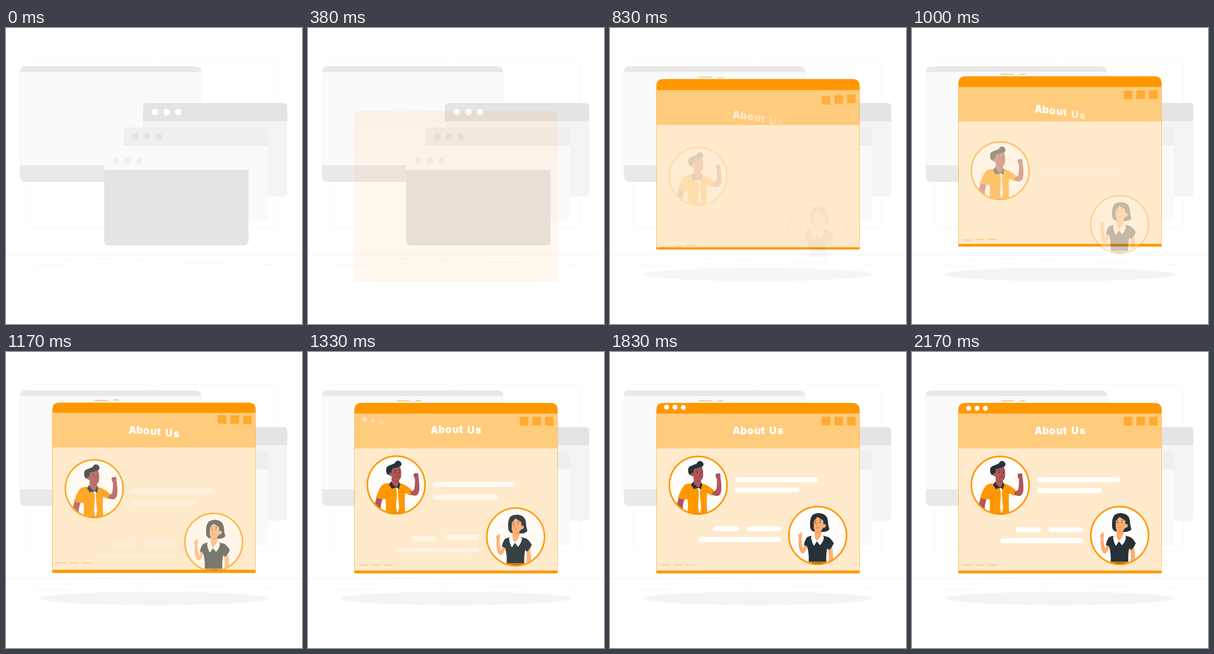
Recreate the animation shown at these times as an HTML page. Size 500 by 500 pixels, loop 2210 ms.

```html
<!DOCTYPE html>
<html lang="en">
<head>
<meta charset="utf-8">
<title>About Us</title>
<style>
html, body { margin: 0; width: 100%; height: 100%; overflow: hidden; background: #fff; }
svg { display: block; width: 100vw; height: 100vh; }
text { font: 900 17px Inter, "Open Sans", "DejaVu Sans", sans-serif; fill: #fff; }
</style>
</head>
<body>
<svg viewBox="0 0 500 500">
  <defs>
    <clipPath id="ringA"><circle cx="149" cy="225" r="48.6"/></clipPath>
    <clipPath id="ringB"><circle cx="350.8" cy="309.8" r="48.6"/></clipPath>
  </defs>

  <!-- backdrop -->
  <g fill="none" stroke="#f7f7f7">
    <rect x="38.8" y="55.3" width="203.6" height="282.2" rx="5"/>
    <rect x="255" y="55.3" width="203.6" height="282.2" rx="5"/>
    <path d="M0 382.4H500" stroke="#f2f2f2"/>
    <path stroke="#f2f2f2" d="M49 401.8H104M97 392.6H111M152 389.6H176M216 391.3H240M304 395.5H368M431 399.4H449"/>
  </g>
  <rect x="23.3" y="64.7" width="306.5" height="195.3" rx="9" fill="#e9e9e9"/>
  <rect x="23.6" y="74.4" width="306" height="157.6" fill="#fafafa"/>
  <g id="cards"></g>

  <ellipse id="shade" cx="249.8" cy="416.2" rx="193.8" ry="11.3" fill="#f4f4f4"/>

  <!-- main window -->
  <g data-w="0">
    <path fill="#ff9800" d="M78.3 373.9V98Q78.3 86 90.3 86H409.7Q421.7 86 421.7 98V373.9Z"/>
    <g id="panes" fill="#fff">
      <rect class="pane" x="78.8" y="104" width="342.5" height="58.4" data-a=".49"/>
      <rect class="pane" x="78.8" y="162.4" width="342.5" height="206.7" data-a=".8"/>
      <rect id="glint" x="78.8" y="103.6" width="342.5" height="1"/>
    </g>
  </g>
  <g fill="#ff9800" fill-opacity=".62">
    <rect data-w="0" x="150" y="81.8" width="22" height="1.5"/>
    <rect data-w=".5" x="182" y="81.8" width="9.3" height="1.5"/>
    <rect data-w="1.6" x="357.8" y="109.6" width="14.4" height="14.4"/>
    <rect data-w="1.2" x="379.1" y="109.6" width="14.4" height="14.4"/>
    <rect data-w=".9" x="400.4" y="109.6" width="14.4" height="14.4"/>
  </g>
  <g fill="#ff9800" fill-opacity=".48">
    <rect data-w="3" x="86.3" y="359.4" width="14.8" height="1.4"/>
    <rect data-w="2.5" x="107.7" y="359.4" width="14.6" height="1.4"/>
    <rect data-w="2" x="128.8" y="359.4" width="15" height="1.4"/>
  </g>
  <g id="title"></g>

  <g fill="#fff">
    <circle data-s="15.2" cx="95.6" cy="95" r="4.2"/>
    <circle data-s="16.1" cx="109.8" cy="95" r="4.2"/>
    <circle data-s="17" cx="124" cy="95" r="4.2"/>
    <rect data-s="11.1" x="211" y="211.7" width="140" height="8.4" rx="4.2"/>
    <rect data-s="12.3" x="211" y="229.8" width="109.4" height="8.4" rx="4.2"/>
    <rect data-s="13" x="230.5" y="296" width="58.7" height="8.4" rx="4.2"/>
    <rect data-s="13.8" x="175" y="296" width="43" height="8.4" rx="4.2"/>
    <rect data-s="14.2" x="149.3" y="314.3" width="140" height="8.4" rx="4.2"/>
  </g>

  <!-- man -->
  <g data-s="6.2">
    <circle cx="149" cy="225" r="49" fill="#fffefc"/>
    <g clip-path="url(#ringA)">
      <path fill="#b0565a" d="M116 246L126 249Q122 257 123 272H110Q112 258 116 246Z"/>
      <path fill="#b0565a" d="M172 234Q177 237 179.5 232Q181 226 180.6 214.5Q178 212 178.6 206.5Q180 204.6 182 205.8L185.4 204.6Q187.2 208 186.6 212Q188.8 224 188 234Q186.6 243.5 180 243.2L170 241Z"/>
      <path fill="#ff9800" d="M138 222Q128 222 124.5 226Q119 234 114.7 246.4Q121 249.6 131 248.6Q132.5 260 130.5 278H165Q162.5 258 164 238.5L172.6 243Q172.5 238 175.4 233.6Q166 225 155.5 222Z"/>
      <path fill="none" stroke="#e58600" stroke-width=".6" d="M131 249Q133 243 132.4 236M164 239Q162.6 234 163.6 230"/>
      <path fill="#fff" d="M148.6 230H153Q151.4 236 152 243L154 263L151.4 274L148.6 263L150 243Q150.4 236 148.6 230Z"/>
      <path fill="#263238" d="M140 219.5L137 224.5L141.5 231.5L150 229L153.4 232.6L155.8 224.2L153.8 219.8Z"/>
      <path fill="#b0565a" d="M141 207L141.4 221Q146.5 229.5 150 228Q154 225 153.4 215Z"/>
      <path fill="#8f4147" d="M144 213Q148 218 153.4 217V219.5Q148 221 144 213Z"/>
      <path fill="#b0565a" d="M139 196Q148 190 156 195Q158 202 157.5 209Q156.8 217.6 151 217.8Q143.6 217.6 141 210Q137 210.5 136.8 206.4Q137.4 203 140 204Z"/>
      <path fill="#263238" d="M134.2 207.4Q131.2 203 132.2 197.4Q132.4 193.6 138 192Q142 190.2 146.4 188.4Q148.4 184 152.4 183.9Q157.4 185 158 189.8Q157.8 194 152.6 194.8Q146 197.4 142.4 197.2Q141 200.4 140.6 205Q138.6 203.2 137.4 205.6L137.4 208Z"/>
      <g fill="#263238"><circle cx="147.2" cy="203.5" r=".9"/><circle cx="154.4" cy="203.5" r=".9"/></g>
      <path fill="none" stroke="#263238" stroke-width=".8" d="M145.2 200.8Q147 199.4 149 200.3M153 200Q154.8 199.3 156 200.6"/>
      <path fill="none" stroke="#7c3439" stroke-width=".8" d="M151.4 203.6L153 208L151.2 208.4M147.4 210.6Q151 213.4 154.6 210.6M182 206V210"/>
      <path fill="none" stroke="#263238" stroke-width="2" d="M129 272.4Q148 274.4 166 272"/>
    </g>
    <circle cx="149" cy="225" r="48.7" fill="none" stroke="#ff9800" stroke-width="2.7"/>
  </g>

  <!-- woman -->
  <g data-s="8.5">
    <circle cx="350.8" cy="309.8" r="49" fill="#fffefc"/>
    <g clip-path="url(#ringB)">
      <path fill="#263238" d="M338.2 297Q336.6 281 342.4 275Q349 271.2 356 272.4Q366.6 274.4 368 284.6Q368.2 293 370.6 299.6Q367 304.4 358 304L346 303.6Q340 303 338.2 297Z"/>
      <path fill="#fdae72" d="M329 324Q326.6 331 326.4 333Q323.6 324 323.4 314.6Q325 309.6 323.4 304.2Q322 303.6 321.4 306.4L318.4 307.4Q317.2 311 318.8 315.4Q317.6 327 320.4 335Q322.4 341.4 327 340.2Q331 337.6 333.6 327Z"/>
      <path fill="#fdae72" d="M368 330L374.6 328.6Q377.8 340 376.6 358H368.4Q371 345 368 330Z"/>
      <path fill="#263238" d="M341 310.6Q334 311.4 331.6 314.4Q328.6 320 327.4 325.4L333 328.4Q336.6 341 335.6 354.6H365.4Q364.6 342 367 331.6L370 334.6Q375.4 330 378 323Q373 314.4 368 312.2L359 310Z"/>
      <path fill="#fdae72" d="M345.6 299L345.4 311L349 321L358 311.6L356.4 298Z"/>
      <path fill="#fff" d="M345 308.4Q341 310 339.6 312.2Q340.4 321.4 344.6 327.6L349.4 319.8L354.8 326.4Q361 319.4 361.4 312.4Q359 309 356.8 308.4Q355 314 349.4 319.4Q346 314.4 345 308.4Z"/>
      <path fill="#f08f52" d="M346 302.6Q351 305.4 356.4 300.6V304Q350 308 346 302.6Z"/>
      <path fill="#fdae72" d="M344.6 284.6Q348 281.4 350.6 278.4Q355 281.4 360 284.4L360.6 291Q364 289.6 364.8 293Q364 297.4 360 297Q357 303.6 350.6 303.6Q344.6 303 344 295.4Z"/>
      <g fill="#263238"><circle cx="347.2" cy="288" r=".9"/><circle cx="354.4" cy="288" r=".9"/></g>
      <path fill="none" stroke="#263238" stroke-width=".8" d="M345.4 284.8Q346.6 283.6 348.2 284.6M353.2 284.2Q355 283.4 356.8 285"/>
      <path fill="none" stroke="#d86f45" stroke-width=".8" d="M349.6 288.4L348 292.6H349.8M347.6 296Q350.4 298.2 353.4 295.4"/>
      <rect x="335" y="354.2" width="31" height="2" fill="#d87f00"/>
      <rect x="334.6" y="356.2" width="32" height="6" fill="#263238"/>
    </g>
    <circle cx="350.8" cy="309.8" r="48.7" fill="none" stroke="#ff9800" stroke-width="2.7"/>
  </g>
</svg>
<script>
const LOOP = 2210, BEGIN = 380, STEP = 125 / 3;
const NS = 'http://www.w3.org/2000/svg';
const $ = id => document.getElementById(id);
const clamp = v => Math.max(0, Math.min(1, v));

function add(parent, tag, attrs, text) {
  const el = document.createElementNS(NS, tag);
  for (const name in attrs) el.setAttribute(name, attrs[name]);
  if (text) el.textContent = text;
  parent.appendChild(el);
  return el;
}

function card(x, y, head, body, dot) {
  const g = $('cards');
  add(g, 'rect', { x, y, width: 243.8, height: 158.2, rx: 7, fill: body });
  add(g, 'path', { fill: head, d: `M${x} ${y + 30.6}v-23.6q0 -7 7 -7h229.8q7 0 7 7v23.6z` });
  for (let i = 0; i < 3; i++)
    add(g, 'circle', { cx: x + 20 + i * 19.7, cy: y + 15.3, r: 5.6, fill: dot });
}
card(231.3, 126.8, '#e4e4e4', '#f4f4f4', '#fff');
card(198.5, 168, '#efefef', '#fafafa', '#e4e4e4');
card(165.8, 209, '#fafafa', '#e4e4e4', '#f0f0f0');

const xs = [206.8, 220.2, 231.8, 243.8, 255.1, 0, 269, 283];
const letters = [...'About Us'].map((ch, i) => ch === ' ' ? null :
  { start: 1.2 + i * 0.66, el: add($('title'), 'text', { x: xs[i], y: 139.2 }, ch) }).filter(Boolean);

// cubic-bezier(.36, -.01, .5, 1.38)
function ease(x) {
  if (x <= 0) return 0;
  if (x >= 1) return 1;
  const at = (s, a, b) => 3 * (1 - s) * s * ((1 - s) * a + s * b) + s * s * s;
  let lo = 0, hi = 1;
  for (let i = 0; i < 24; i++) {
    const mid = (lo + hi) / 2;
    if (at(mid, 0.36, 0.5) < x) lo = mid; else hi = mid;
  }
  return at(lo, -0.01, 1.38);
}

const slide = (k, start) => ease((k - start) / 24);
const lift = k => 69 * (1 - ease((k + 6.2) / 25.5));
const fade = k => clamp((k + 1) / 12);

function place(el, dy, alpha) {
  el.setAttribute('transform', `translate(0 ${dy.toFixed(3)})`);
  el.setAttribute('opacity', clamp(alpha).toFixed(4));
}

const lifted = [...document.querySelectorAll('[data-w]')].map(el => ({ el, lag: +el.dataset.w }));
const slid = [...document.querySelectorAll('[data-s]')].map(el => ({ el, start: +el.dataset.s }));
const panes = [...document.querySelectorAll('.pane')];

function draw(t) {
  // 24 steps a second, on a 10 ms clock
  const k = Math.ceil((Math.floor(t / 10) * 10 + 10 - BEGIN) / STEP - 1e-6) - 1;
  const on = k >= 0;
  for (const { el, lag } of lifted) place(el, lift(k - lag), on ? fade(k - lag) : 0);
  place($('panes'), lift(k - 0.35) - lift(k), 1);
  const veil = clamp(0.36 + 0.058 * k);
  for (const el of panes) el.setAttribute('opacity', el.dataset.a * veil);
  $('glint').setAttribute('opacity', 0.5 * clamp((14 - k) / 5));
  $('shade').setAttribute('opacity', on ? clamp((k + 1) / 15) : 0);
  for (const { el, start } of slid) {
    const p = slide(k, start);
    place(el, 30 * (1 - p), p);
  }
  for (const { el, start } of letters) {
    const p = slide(k, start);
    place(el, 30 * (1 - p) + 0.4 * Math.max(0, lift(k)), on ? p * 1.2 : 0);
  }
}

const t0 = performance.now();
function tick() {
  draw((performance.now() - t0) % LOOP);
  requestAnimationFrame(tick);
}
draw(0);
requestAnimationFrame(tick);
</script>
</body>
</html>
```
